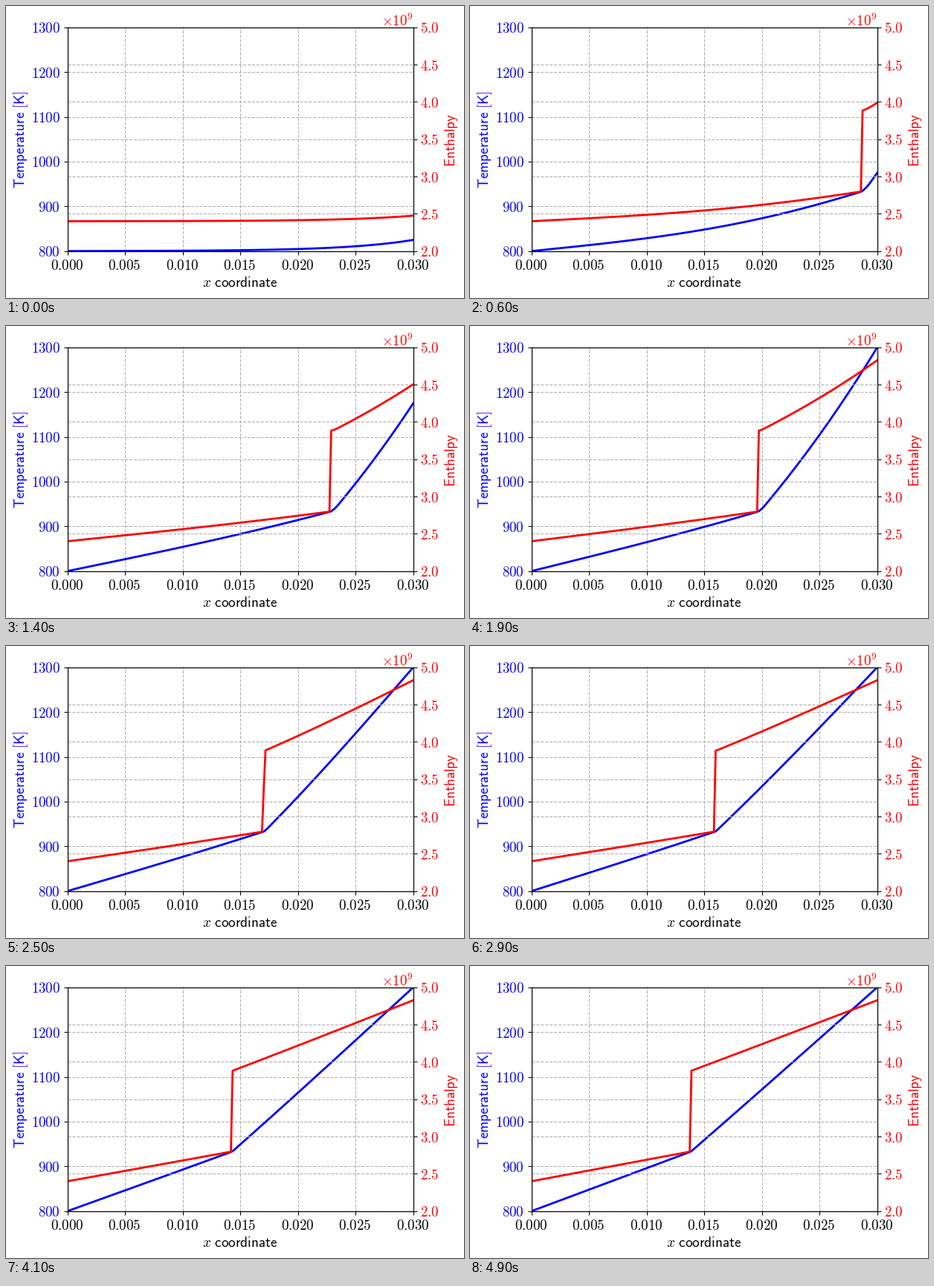
A matplotlib script for the animation above (5000 ms loop, 616 px wide and 394 px high).

```python
import numpy as np
import matplotlib.pyplot as plt
from matplotlib.animation import FuncAnimation
from matplotlib.transforms import ScaledTranslation

W, H, DPI = 616, 394, 100
FRAMES, INTERVAL = 50, 100
TICK_FONT, LABEL_FONT = 13.6, 13.8

# Bar heated at its right end until part of it melts
LENGTH, CELLS, DT = 0.03, 600, 0.5
SHOW_EVERY = 3
T_COLD, T_HOT, T_MELT, MUSH = 800.0, 1300.0, 933.0, 0.2
K_SOLID, K_LIQUID = 211.0, 95.0
C_SOLID, C_LIQUID, H_LIQUID = 3.0e6, 2.58e6, 3.88e9
STEP = LENGTH / CELLS


def conduction_potential(temp):
    """Integral of the conductivity, measured from the melting point."""
    rise = np.asarray(temp) - T_MELT
    return rise * np.where(rise < 0, K_SOLID, K_LIQUID)


def temperature(u):
    return T_MELT + u / np.where(u < 0, K_SOLID, K_LIQUID)


T_NODES = np.array([500, T_MELT - MUSH, T_MELT + MUSH, 1800])
U_NODES = conduction_potential(T_NODES)
H_NODES = np.array([
    C_SOLID * T_NODES[0],
    C_SOLID * T_NODES[1],
    H_LIQUID,
    H_LIQUID + C_LIQUID * (T_NODES[3] - T_NODES[2]),
])
H_SLOPES = np.diff(H_NODES) / np.diff(U_NODES)


def enthalpy(u):
    return np.interp(u, U_NODES, H_NODES)


def enthalpy_slope(u):
    return H_SLOPES[np.digitize(u, U_NODES[1:3])]


def solve_tridiagonal(diagonal, off, rhs):
    """Thomas algorithm for a constant off-diagonal."""
    d, r = diagonal.tolist(), rhs.tolist()
    for i in range(1, len(d)):
        w = off / d[i - 1]
        d[i] -= w * off
        r[i] -= w * r[i - 1]
    r[-1] /= d[-1]
    for i in range(len(d) - 2, -1, -1):
        r[i] = (r[i] - off * r[i + 1]) / d[i]
    return np.array(r)


def implicit_step(u, ends):
    """Backward Euler step, solved by Newton with a line search."""
    start = enthalpy(u)
    scale = DT / STEP**2
    stiffness = np.full(CELLS, 2 * scale)
    stiffness[[0, -1]] = 3 * scale

    def residual(v):
        ghosts = 2 * ends - v[[0, -1]]
        padded = np.concatenate([ghosts[:1], v, ghosts[1:]])
        return enthalpy(v) - start - scale * np.diff(padded, 2)

    for _ in range(100):
        f = residual(u)
        if np.abs(f).max() < 1e4:
            break
        d = -solve_tridiagonal(stiffness + enthalpy_slope(u), -scale, f)
        t = 1.0
        if d @ residual(u + d) > 0:
            low, high = 0.0, 1.0
            for _ in range(18):
                t = (low + high) / 2
                if d @ residual(u + t * d) > 0:
                    high = t
                else:
                    low = t
        u = u + t * d
    return u


def simulate():
    u = np.full(CELLS, float(conduction_potential(T_COLD)))
    profiles = []
    for n in range(FRAMES):
        t_right = min(T_COLD + 25 * (n + 1), T_HOT)
        ends = conduction_potential([T_COLD, t_right])
        u = implicit_step(u, ends)
        shown = u[SHOW_EVERY // 2::SHOW_EVERY]
        profiles.append(np.concatenate([ends[:1], shown, ends[1:]]))
    return profiles


centres = (np.arange(CELLS) + 0.5) * STEP
x = np.concatenate([[0], centres[SHOW_EVERY // 2::SHOW_EVERY], [LENGTH]])
profiles = simulate()

plt.rcParams["mathtext.fontset"] = "cm"
fig = plt.figure(figsize=(W / DPI, H / DPI), dpi=DPI, facecolor="white")
ax = fig.add_axes([82.8 / W, 63.3 / H, 465 / W, 302 / H])
ax2 = ax.twinx()


def set_ticks(axis, values, fmt, color, pad):
    axis.set_ticks(values, [f"${v:{fmt}}$" for v in values])
    axis.set_tick_params(labelcolor=color, labelsize=TICK_FONT, pad=pad)


def label(px, py, text, color="black", **kwargs):
    style = dict(ha="center", va="center", fontsize=LABEL_FONT) | kwargs
    fig.text(px / W, 1 - py / H, text, color=color, **style)


ax.set(xlim=(0, LENGTH), ylim=(800, 1300))
ax2.set_ylim(2, 5)
set_ticks(ax.xaxis, np.linspace(0, LENGTH, 7), ".3f", "black", 3.6)
set_ticks(ax.yaxis, np.arange(800, 1301, 100), "d", "blue", 3.7)
set_ticks(ax2.yaxis, np.arange(2, 5.1, 0.5), ".1f", "red", 3.14)
nudge = ScaledTranslation(-1 / DPI, 0, fig.dpi_scale_trans)
for tick_label in ax.get_xticklabels():
    tick_label.set_transform(tick_label.get_transform() + nudge)
ax.grid(linestyle="--")
ax2.grid(linestyle="--")

label(19.7, 180, r"$\mathsf{Temperature\ [K]}$", "blue", rotation=90)
label(599.5, 181, r"$\mathsf{Enthalpy}$", "red", rotation=90)
label(314.2, 373.9, r"$x\ \mathsf{coordinate}$")
label(547, 27.3, r"$\times10^{9}$", "red", ha="right", va="baseline",
      fontsize=TICK_FONT)

temp_line, = ax.plot([], [], color="blue", lw=2)
enth_line, = ax2.plot([], [], color="red", lw=2)


def update(n):
    u = profiles[n]
    temp_line.set_data(x, temperature(u))
    enth_line.set_data(x, enthalpy(u) / 1e9)
    return temp_line, enth_line


anim = FuncAnimation(fig, update, frames=FRAMES, interval=INTERVAL,
                     repeat=True, repeat_delay=0)
plt.show()
```
